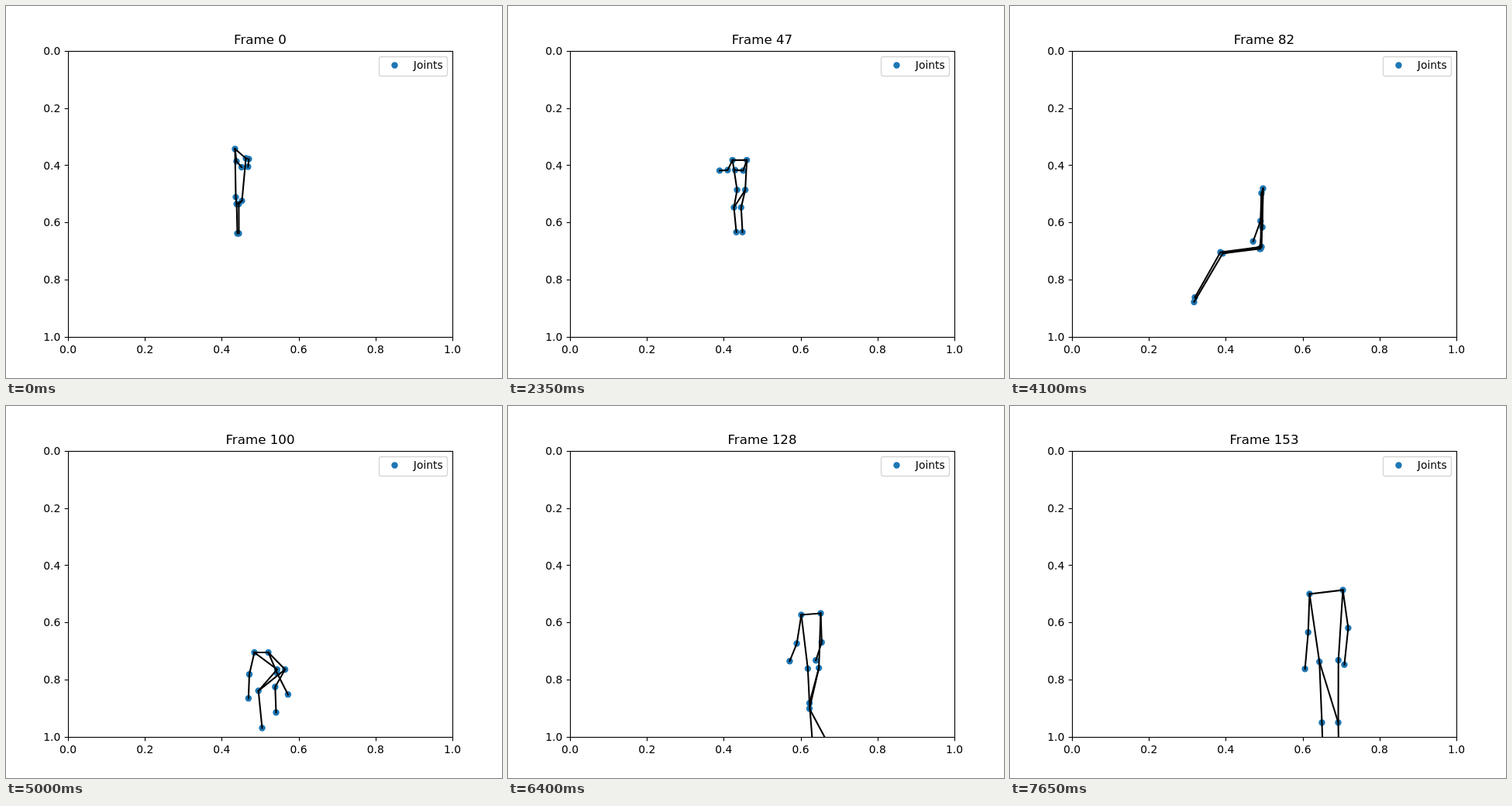
An HTML page with a canvas that plays this animation: 640 px wide and 480 px high, repeating every 7.7 s.

```html
<!DOCTYPE html>
<html lang="en">
<head>
<meta charset="utf-8">
<title>Joint plot</title>
<style>
html, body { margin: 0; width: 100%; height: 100%; overflow: hidden; background: #fff; }
canvas, svg { position: absolute; left: 0; top: 0; width: 640px; height: 480px; }
text { font-family: "DejaVu Sans", sans-serif; font-size: 13.89px; fill: #000; }
#title { font-size: 16.67px; }
</style>
</head>
<body>
<canvas id="plot" width="640" height="480"></canvas>
<svg id="labels" viewBox="0 0 640 480">
  <text id="title" x="328" y="49" text-anchor="middle">Frame 0</text>
  <text x="525.8" y="81">Joints</text>
</svg>
<script>
const STEP = 50, COUNT = 154, BLUE = '#1f77b4';
const AX = { x: 80, y: 57.6, w: 496, h: 369.6 };
const ctx = document.getElementById('plot').getContext('2d');
const labels = document.getElementById('labels');
const title = document.getElementById('title');

// neck, hip, knee, foot: points on the body's midline
// span: half shoulder line (dx, dy); stride: knee and foot gap relative to it
// lift: height difference of the feet
// arm: upper length, lower length, upper length of the first arm relative to the second
// bend: upper and lower angle in degrees, first arm, then second
// A key lists only what changes since the key before it.
const changes = [
  [0, { neck: [302, 190], hip: [300, 248.5], knee: [298.5, 255], foot: [299, 293],
    span: [7, 6], stride: [0.2, 0.14], lift: [0], arm: [16, 10, 0.25], bend: [14, 96, 83, 49] }],
  [15, { neck: [296.5, 186], hip: [299, 224.5], knee: [296.5, 255], foot: [297, 290],
    span: [9.5, 0], stride: [0.58, 0.42], arm: [17.5, 6, 1], bend: [95, 137, 110, 72] }],
  [30, {}],
  [61, { neck: [300, 208.5], hip: [301.5, 247], knee: [295, 263], foot: [299, 292.5],
    span: [9, 0], stride: [0.44, 0.44], arm: [11.7, 14, 1], bend: [121, 222, 121, 262] }],
  [80, { neck: [325, 238], hip: [323.5, 311.5], knee: [187, 325], foot: [42, 374],
    span: [1, -3], stride: [-1.5, 0.5], lift: [-3], arm: [36, 28, 1.39], bend: [91, 97, 92, 110] }],
  [82, { knee: [272.5, 318], foot: [237.5, 378.5] }],
  [100, { neck: [329, 317.5], hip: [354.5, 339.5], knee: [336, 364.5], foot: [339, 405],
    span: [9, 0], stride: [1.2, 1], lift: [-10], arm: [29, 31, 1], bend: [67, 63, 103, 92] }],
  [128, { neck: [390.5, 268], hip: [393.5, 338], knee: [388.5, 386.5], foot: [416.7, 471],
    span: [12.5, -1], stride: [0, 1.8], lift: [14], arm: [37.5, 24.5, 1], bend: [88, 108, 99, 112] }],
  [153, { neck: [407.5, 239.5], hip: [411, 328.5], knee: [412.5, 408], foot: [414, 465],
    span: [-21.5, 2.5], stride: [0.49, 0.47], lift: [0], arm: [49.5, 47.5, 1], bend: [92, 95, 82, 96] }]
];

let carried = {};
const keys = changes.map(([n, change]) => [n, carried = { ...carried, ...change }]);

function bodyAt(n) {
  let k = 0;
  while (k < keys.length - 2 && n >= keys[k + 1][0]) k++;
  const [n0, a] = keys[k], [n1, b] = keys[k + 1];
  const u = (n - n0) / (n1 - n0), body = {};
  for (const name in a) body[name] = a[name].map((v, i) => v + (b[name][i] - v) * u);
  return body;
}

const shift = ([x, y], dx, dy) => [x + dx, y + dy];

function swing(from, length, degrees) {
  const r = degrees * Math.PI / 180;
  return shift(from, length * Math.cos(r), length * Math.sin(r));
}

// Joints of one half of the body; sign is 1 or -1.
function half(b, sign) {
  const first = sign > 0;
  const w = sign * b.span[0], tilt = sign * b.span[1], lift = sign * b.lift[0];
  const [up, low] = first ? b.bend : b.bend.slice(2);
  const shoulder = shift(b.neck, w, tilt);
  const elbow = swing(shoulder, b.arm[0] * (first ? b.arm[2] : 1), up);
  return {
    shoulder, elbow,
    wrist: swing(elbow, b.arm[1], low),
    hip: shift(b.hip, w * 0.57, tilt * 0.4),
    knee: shift(b.knee, w * b.stride[0], lift * 0.25),
    foot: shift(b.foot, w * b.stride[1], lift)
  };
}

function dot([x, y]) {
  ctx.beginPath();
  ctx.arc(x, y, 4.2, 0, Math.PI * 2);
  ctx.fill();
}

function path(...points) {
  ctx.beginPath();
  for (const p of points) ctx.lineTo(...p);
  ctx.stroke();
}

function drawBody(b) {
  const p = half(b, 1), q = half(b, -1);
  ctx.save();
  ctx.beginPath();
  ctx.rect(AX.x, AX.y, AX.w, AX.h);
  ctx.clip();
  ctx.translate(0.5, 0.5);
  ctx.fillStyle = BLUE;
  ctx.strokeStyle = '#000';
  ctx.lineWidth = 2.08;
  ctx.lineCap = 'square';
  for (const s of [p, q]) Object.values(s).forEach(dot);
  for (const s of [p, q]) {
    path(s.shoulder, s.elbow, s.wrist);
    path(s.shoulder, s.hip, s.knee, s.foot);
  }
  path(p.shoulder, q.shoulder);
  path(p.hip, q.knee);
  ctx.restore();
}

const snap = v => Math.floor(v + 0.5) + 0.5;
const tickX = i => AX.x + AX.w * i / 5;
const tickY = i => AX.y + AX.h * i / 5;

function addLabel(str, x, y, anchor) {
  const el = document.createElementNS(labels.namespaceURI, 'text');
  el.setAttribute('x', x);
  el.setAttribute('y', y);
  el.setAttribute('text-anchor', anchor);
  el.textContent = str;
  labels.append(el);
}

for (let i = 0; i <= 5; i++) {
  const str = (i / 5).toFixed(1);
  addLabel(str, tickX(i), 448, 'middle');
  addLabel(str, 70.3, Math.round(tickY(i) + 5.1), 'end');
}

function drawAxes() {
  const l = snap(tickX(0)), t = snap(tickY(0)), r = snap(tickX(5)), b = snap(tickY(5));
  ctx.strokeStyle = '#000';
  ctx.lineWidth = 1.11;
  ctx.lineCap = 'butt';
  ctx.strokeRect(l, t, r - l, b - t);
  for (let i = 0; i <= 5; i++) {
    const x = snap(tickX(i)), y = snap(tickY(i));
    path([x, b], [x, b + 4.86]);
    path([l, y], [l - 4.86, y]);
  }
}

function drawLegend() {
  ctx.beginPath();
  ctx.roundRect(481.5, 65.5, 88, 25, 2.78);
  ctx.fillStyle = 'rgba(255,255,255,0.8)';
  ctx.strokeStyle = 'rgba(204,204,204,0.8)';
  ctx.lineWidth = 1.39;
  ctx.fill();
  ctx.stroke();
  ctx.fillStyle = BLUE;
  dot([501.5, 76.5]);
}

let shown = -1;
function draw(time) {
  const n = Math.floor(time / STEP) % COUNT;
  if (n === shown) return;
  shown = n;
  ctx.fillStyle = '#fff';
  ctx.fillRect(0, 0, 640, 480);
  drawBody(bodyAt(n));
  drawAxes();
  drawLegend();
  title.textContent = 'Frame ' + n;
}

const begin = performance.now();
function tick() {
  draw(performance.now() - begin);
  requestAnimationFrame(tick);
}
tick();
</script>
</body>
</html>
```
